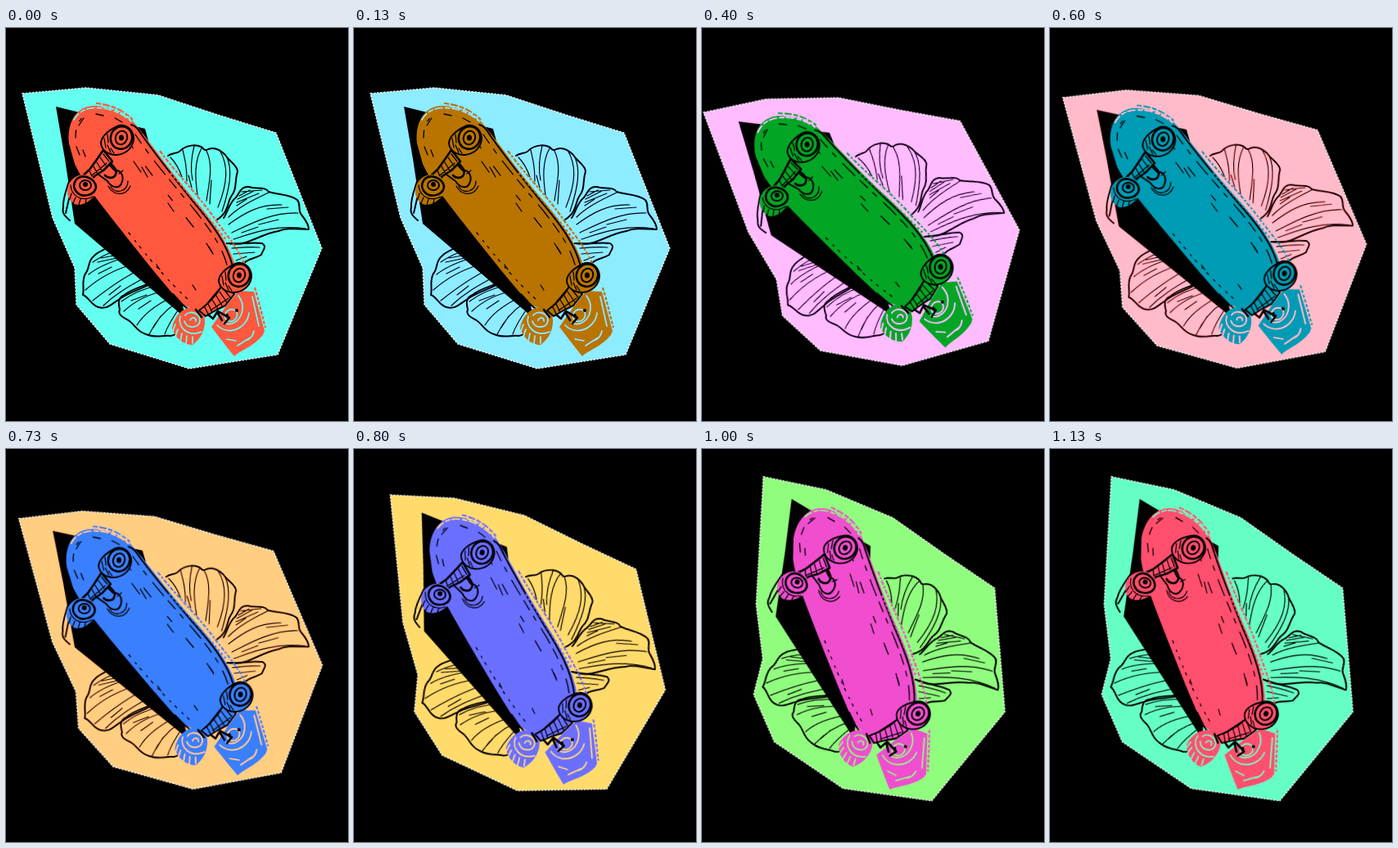
Recreate the animation shown at these times as an HTML page. Size 418 by 480 pixels, loop 1190 ms.

```html
<!DOCTYPE html>
<html lang="en">
<head>
<meta charset="utf-8">
<title>Skateboard</title>
<style>
  html, body { margin: 0; width: 100%; height: 100%; overflow: hidden; background: #000; }
  svg { display: block; width: 100vw; height: 100vh; animation: hue 1190ms step-end infinite; }
  #art { transform-origin: 203px 242px; animation: sway 1190ms step-end infinite; }

  .paper { fill: #64fff0; }
  .rim { fill: none; stroke: #fff; stroke-width: 1.5; stroke-dasharray: 2.5 1.5; opacity: .85; }
  .red, .body { fill: #ff583e; }
  .ink, .vein, .mark { fill: none; stroke: #000; stroke-linecap: round; stroke-linejoin: round; }
  .ink { stroke-width: 2; }
  .vein { stroke-width: 1.2; }
  .mark { stroke-width: 1.3; }
  .bold { stroke-width: 2.6; }
  .ink.body { fill: #ff583e; }
  .cut { fill: none; stroke: #64fff0; stroke-width: 1.7; stroke-linecap: round; }
  .fringe { fill: none; stroke: #ff583e; stroke-width: 2.2; }

  /* each pose holds for three colour steps */
  @keyframes sway {
    0% { transform: rotate(0deg); }
    16.806% { transform: rotate(-5.5deg); }
    33.613% { transform: rotate(-6.9deg); }
    50.42% { transform: rotate(-1.55deg); }
    67.226% { transform: rotate(8deg); }
    84.033% { transform: rotate(16.9deg); }
  }
  @keyframes hue {
    0% { filter: hue-rotate(0deg); }
    5.882% { filter: hue-rotate(20deg); }
    10.924% { filter: hue-rotate(40deg); }
    16.806% { filter: hue-rotate(60deg); }
    22.689% { filter: hue-rotate(80deg); }
    27.731% { filter: hue-rotate(100deg); }
    33.613% { filter: hue-rotate(120deg); }
    39.495% { filter: hue-rotate(140deg); }
    44.537% { filter: hue-rotate(160deg); }
    50.42% { filter: hue-rotate(180deg); }
    56.302% { filter: hue-rotate(200deg); }
    61.344% { filter: hue-rotate(220deg); }
    67.226% { filter: hue-rotate(240deg); }
    73.109% { filter: hue-rotate(260deg); }
    78.151% { filter: hue-rotate(278deg); }
    84.033% { filter: hue-rotate(300deg); }
    89.915% { filter: hue-rotate(320deg); }
    94.957% { filter: hue-rotate(340deg); }
  }
</style>
</head>
<body>
<svg viewBox="0 0 418 480" preserveAspectRatio="none">
  <defs>
    <path id="sheet" d="M20 80 L98 73 L186 82 L262 107 L330 128 L386 269 L332 399 L224 416 L127 386 L86 338 L84 293 L57 232Z"/>
    <g id="wheel">
      <path class="ink body" d="M0 -17 C9 -21 19 -14 20 -3 C20 9 11 17 -1 18 C-12 18 -19 12 -20 4 C-20 -4 -11 -12 0 -17Z"/>
      <ellipse class="ink bold" cx="5" cy="-3" rx="13" ry="14" transform="rotate(25 5 -3)"/>
      <ellipse class="ink" cx="5" cy="-3" rx="7" ry="8.5" transform="rotate(25 5 -3)"/>
      <ellipse cx="5" cy="-3" rx="3" ry="3.6"/>
      <path class="mark" d="M-12 -7 L-11 3 M-16 -2 L-14 9 M-8 10 L-4 16 M-12 6 L-8 15"/>
    </g>
  </defs>

  <g id="art">
    <use href="#sheet" class="paper"/>
    <use href="#sheet" class="rim"/>

    <!-- petals -->
    <g>
      <path class="ink" d="M198 156 C204 152 210 154 214 149 C221 143 232 142 238 145 C241 146 242 150 245 149 C254 144 262 149 268 155 C273 163 283 168 283 175 C279 188 283 196 275 206 C270 214 273 224 258 234"/>
      <path class="vein" d="M201 158 C208 165 212 173 215 182 M216 149 C219 162 221 170 221 187 M230 144 C226 160 225 172 228 186 M239 147 C230 163 231 183 234 204 M245 150 C254 168 248 190 245 211 M262 151 C271 167 272 187 259 219 M270 158 C277 173 274 194 264 224 M251 186 L249 215 M223 180 L227 195"/>
      <path class="ink" d="M266 232 C271 225 273 213 281 207 C286 201 287 193 297 194 C305 197 316 193 321 200 C333 204 347 203 356 210 C361 216 356 221 361 228 C365 233 370 239 370 246 C356 246 345 243 333 248 C316 251 306 258 293 262 C284 265 278 263 270 263"/>
      <path class="vein" d="M272 231 C284 219 300 211 321 201 M272 240 C291 226 310 215 337 216 M276 250 C299 239 325 225 357 226 M278 258 C303 250 329 240 366 245 M283 209 L303 199 M282 213 L309 202 M285 205 L298 198 M288 200 L313 198 M282 217 L294 209 M319 221 L345 219 M309 240 L333 234 M288 250 L308 243"/>
      <path class="ink" d="M270 263 C286 265 298 261 313 263 C320 267 313 272 312 277 C304 282 297 281 291 287 L282 291"/>
      <path class="vein" d="M276 269 C288 268 297 267 310 268 M278 276 L304 274 M281 284 L294 279"/>
      <path class="ink" d="M128 264 C123 271 114 272 108 278 C99 285 103 293 97 300 C92 309 96 317 94 326 C101 328 104 339 113 341 C125 344 130 336 139 331 C151 322 168 319 187 307"/>
      <path class="vein" d="M131 273 C121 277 113 281 106 286 M143 281 C127 286 112 292 101 301 M154 289 C133 295 115 304 97 320 M164 295 C145 304 126 317 106 333 M175 302 C155 313 137 322 119 339 M116 281 L137 277 M112 286 L140 280 M113 300 L129 292 M126 326 L140 315"/>
      <path class="ink" d="M187 307 C171 315 153 318 145 326 C135 330 138 338 139 344 C136 351 145 354 151 358 C157 362 160 371 171 374 C182 379 192 375 201 376 C211 375 212 367 213 360 L216 344"/>
      <path class="vein" d="M187 314 C169 318 153 325 141 334 M194 321 C174 325 157 334 144 346 M202 329 C184 338 169 348 160 363 M208 336 C194 345 183 358 175 374 M212 342 C205 352 198 362 194 374 M153 333 L172 326 M162 343 L177 333 M180 366 L189 352"/>
      <path class="ink" d="M78 184 C74 198 69 208 70 219 C68 226 72 230 78 235 M79 200 L73 226"/>
    </g>

    <path d="M61 96 L170 123 L180 160 L219 354 L84 239 L72 160Z"/>

    <!-- deck -->
    <path class="red" d="M77 141 C74 113 88 94 109 95 C133 96 150 106 161 121 C184 150 204 179 228 207 C250 233 271 260 280 289 L264 321 L241 347 L215 338 C193 312 169 283 140 246 C119 219 95 190 84 166Z"/>
    <path class="ink" d="M153 118 C160 120 163 126 167 132 C187 160 206 184 228 211 C251 238 270 263 277 291"/>
    <path class="ink" d="M204 325 L216 338 C222 344 231 347 239 346"/>
    <path class="cut" stroke-dasharray="9 4 5 3" d="M83 112 C91 99 103 96 118 98 C133 100 144 106 153 114"/>
    <path class="fringe" stroke-dasharray="6 2 9 2" d="M110 92 C130 94 143 101 155 112"/>
    <path class="cut" stroke-dasharray="5 3" d="M118 96 C132 98 143 103 151 111"/>
    <path class="fringe" stroke-dasharray="5 2 3 2" d="M188 150 C211 181 238 207 258 237 C273 257 286 273 292 290"/>
    <path class="fringe" stroke-dasharray="3 3" d="M201 177 C223 202 248 232 270 260"/>
    <path class="mark" stroke-dasharray="13 9 6 12 21 8" d="M158 130 C179 162 207 194 232 224 C250 247 264 267 270 289"/>
    <path class="mark" stroke-dasharray="8 27 14 31" d="M151 140 C171 173 198 203 225 238 C245 262 259 281 260 292"/>
    <path class="mark" stroke-dasharray="3 9 2 7" d="M150 250 C174 281 196 307 224 333"/>
    <path class="mark" stroke-dasharray="9 12 4 19" d="M85 134 C85 115 93 105 108 104"/>
    <path class="mark" d="M110 105 L119 107 M95 110 L89 119 M133 110 L142 115 M86 145 L90 155 M94 149 L97 157 M156 163 L165 176 M166 170 L173 182 M198 214 L205 224 M245 263 L253 276 M184 289 L188 295 M228 314 L232 320"/>

    <!-- tail -->
    <path class="red" d="M251 365 L267 386 L279 401 C287 393 300 391 314 375 L316 370 L303 322 L284 321 L268 341Z"/>
    <path class="cut" d="M266 360 C276 365 288 357 289 343 C290 336 287 331 284 327 M258 363 C272 377 295 367 297 348 M301 328 L309 364 M303 370 C302 376 299 379 295 381 M270 380 L281 382 M283 388 L297 379"/>
    <path class="fringe" stroke-dasharray="4 2" d="M304 317 C309 333 313 351 317 366"/>
    <ellipse class="cut" cx="275" cy="351" rx="8" ry="7" transform="rotate(-40 275 351)"/>
    <circle cx="270" cy="351" r="2"/><circle cx="282" cy="345" r="2"/>

    <!-- far wheel -->
    <path class="red" d="M203 367 C205 353 216 341 228 341 C239 341 244 350 243 361 C242 373 235 382 228 387 C217 387 207 379 203 367Z"/>
    <path class="cut" d="M213 352 C209 365 222 378 239 371 M219 351 C224 344 238 348 237 358 C235 368 220 367 218 358 M225 357 C227 352 233 354 232 358 M207 362 L204 370 M210 368 L207 377 M215 373 L213 383 M221 376 L220 386 M228 377 L228 385"/>

    <!-- upper truck -->
    <path class="ink body" d="M118 160 C126 165 128 170 133 174 C141 173 145 182 141 190 C138 197 129 195 124 187 L113 179"/>
    <path class="ink bold" d="M121 180 C125 184 132 184 134 179 C137 172 130 169 127 164"/>
    <path class="mark" d="M128 194 C135 204 149 199 149 187 M125 193 C131 205 146 206 152 193 M138 178 L143 174"/>
    <path class="ink body bold" d="M119 149 L130 163 L119 174 L108 181 L101 192 L90 184 L102 173 L110 162Z"/>
    <path class="mark" d="M119 154 L126 163 M115 158 L122 168 M111 164 L117 174 M107 169 L112 178 M102 174 L106 184 M97 179 L101 187 M123 165 L105 180"/>
    <use href="#wheel" x="136" y="137"/>
    <path class="red" d="M77 190 C84 178 98 176 107 183 C115 191 113 202 105 208 C97 216 86 219 80 212 C74 206 74 198 77 190Z"/>
    <path class="ink bold" d="M86 185 C94 177 109 184 110 194 C109 204 94 208 87 201 C82 196 82 190 86 185Z"/>
    <ellipse class="ink" cx="97" cy="192" rx="7" ry="6"/>
    <circle cx="97" cy="191" r="3"/>
    <path class="mark" d="M79 192 C80 205 92 213 106 206 M80 202 L78 209 M85 207 L82 214 M91 209 L89 216 M98 209 L97 214"/>

    <!-- lower truck -->
    <path class="ink body" d="M265 313 L279 325 L268 339 L256 345 L244 352 L236 345 L246 337 L257 325Z"/>
    <path class="mark" d="M265 318 L274 329 M261 322 L270 335 M257 327 L264 339 M252 332 L259 343 M247 337 L252 347 M243 341 L247 349 M262 317 L242 341 M272 330 L250 345"/>
    <path class="ink bold" d="M247 350 L253 355 L258 347 L264 357 M259 346 L273 354 L267 361 M232 344 L239 353"/>
    <use href="#wheel" x="280" y="305"/>
  </g>
</svg>
</body>
</html>
```
